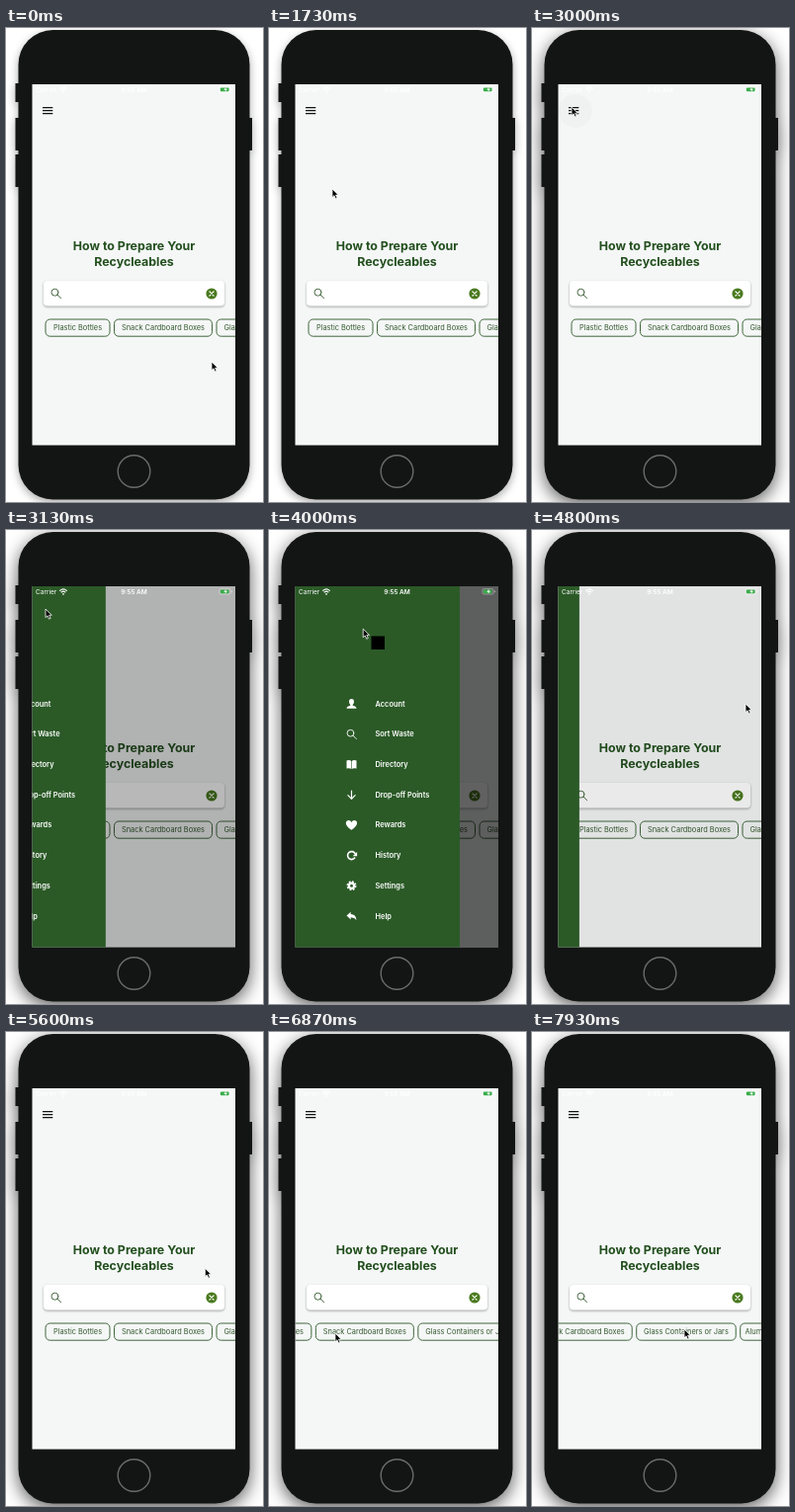
Recreate the animation shown at these times as an HTML page. Size 260x480 px, loop 8000 ms.

```html
<!DOCTYPE html>
<html lang="en">
<head>
<meta charset="utf-8">
<title>Recycling app</title>
<style>
html, body { margin: 0; width: 100%; height: 100%; overflow: hidden; background: #fff; }
svg { display: block; width: 260px; height: 480px; font: 7.4px Inter, sans-serif; }
#body { filter: drop-shadow(0 3px 4px rgba(0,0,0,.35)); }
#body.focused { filter: drop-shadow(0 5px 9px rgba(0,0,0,.65)); }
#bar { filter: drop-shadow(0 1px 1.2px rgba(0,0,0,.35)); }
.title { font-size: 12.4px; font-weight: 700; fill: #234f1e; text-anchor: middle; }
.chip rect { fill: none; stroke: #3f663a; }
.chip text { fill: #35592f; }
.line { fill: none; stroke-linecap: round; stroke-linejoin: round; }
.status { font-size: 6.5px; fill: #fff; }
#menu { fill: #fff; font-weight: 600; }
</style>
</head>
<body>
<svg viewBox="0 0 260 480">
  <defs>
    <clipPath id="screen"><rect x="26.5" y="57" width="205.5" height="365.5"/></clipPath>
  </defs>
  <g id="body" fill="#131414">
    <path d="M9.5 56h4v19h-4zM9.5 91h4v33h-4zM9.5 128h4v33h-4zM245 91h4v33h-4z"/>
    <rect x="12.5" y="2" width="234" height="475.5" rx="35"/>
  </g>
  <circle cx="129.5" cy="449" r="16.3" fill="none" stroke="#6a6b6b" stroke-width="1.4"/>

  <g clip-path="url(#screen)">
    <rect x="26" y="56" width="207" height="368" fill="#f5f7f7"/>
    <circle id="press" cx="44" cy="84" r="17" fill="#000" opacity=".02"/>
    <path d="M37 80.6h10.3M37 83.6h10.3M37 86.6h10.3" stroke="#111" stroke-width="1.3"/>
    <text class="title" x="129.5" y="225">How to Prepare Your</text>
    <text class="title" x="129.5" y="241">Recycleables</text>
    <rect id="bar" x="38" y="256" width="183" height="25.5" rx="4" fill="#fff"/>
    <path class="line" d="M53 267.7a3.5 3.5 0 1 1-7 0a3.5 3.5 0 1 1 7 0M52.1 270.2l3.5 3.5" stroke="#35592f" stroke-width=".9"/>
    <circle cx="208" cy="269" r="5.6" fill="#4a7a1f"/>
    <path class="line" d="M205.9 266.9l4.2 4.2m0-4.2l-4.2 4.2" stroke="#fff" stroke-width="1.2"/>
    <g id="chips"></g>
    <rect id="dim" x="26" y="56" width="207" height="368"/>
    <g id="drawer">
      <rect x="26" y="56" width="167" height="368" fill="#2b5a27"/>
      <rect x="103.5" y="107.5" width="13.5" height="13.5"/>
      <g id="menu"></g>
    </g>
    <g class="status">
      <text x="30" y="65">Carrier</text>
      <text x="129.5" y="65" text-anchor="middle" font-weight="600">9:55 AM</text>
      <path class="line" d="M54.6 61.4q3.4-3 6.8 0M56 63q2-1.7 4 0" stroke="#fff" stroke-width="1.1"/>
      <circle cx="58" cy="64.8" r=".9"/>
      <rect x="216" y="59.6" width="11" height="5.4" rx="1.4" fill="none" stroke="#fff" stroke-opacity=".6" stroke-width=".6"/>
      <path d="M228 61.2q1.4 1 0 2.2z"/>
      <rect x="216.9" y="60.4" width="8.6" height="3.8" rx=".8" fill="#39ad49"/>
      <path d="M222.6 59.8l-2.3 2.9h1.8l-.6 2.1 2.5-3h-1.8z"/>
    </g>
  </g>
  <path id="cursor" d="M0 0v8.6l2-1.8 1.5 3.3 1.6-.7-1.5-3.2h2.7z" fill="#000" stroke="#fff" stroke-width=".8"/>
</svg>

<script>
const $ = id => document.getElementById(id);
const LOOP = 8000;

const chips = [[40, 65, 'Plastic Bottles'], [109.5, 99, 'Snack Cardboard Boxes'],
  [213, 100.5, 'Glass Containers or Jars'], [318, 64, 'Aluminum Cans']];
$('chips').innerHTML = chips.map(([x, w, label]) => `<g class="chip">
  <rect x="${x}" y="295" width="${w}" height="17.2" rx="4.5"/>
  <text x="${x + w / 2}" y="306.3" text-anchor="middle">${label}</text></g>`).join('');

const stroke = (d, width) => `<path class="line" stroke="#fff" stroke-width="${width}" d="${d}"/>`;
const fill = d => `<path d="${d}"/>`;
const items = [
  ['Account', fill('M-2.5-2.3a2.5 2.8 0 0 1 5 0q0 2-1.3 3.2v.8q3.8.8 3.8 3h-10q0-2.2 3.8-3v-.8q-1.3-1.2-1.3-3.2z')],
  ['Sort Waste', stroke('M2.4-1a3.4 3.4 0 1 1-6.8 0a3.4 3.4 0 1 1 6.8 0M1.5 1.5l3.3 3.3', .9)],
  ['Directory', fill('M-5-4q3-1 4.7.5v8q-1.7-1.3-4.7-.4zM5-4q-3-1-4.7.5v8q1.7-1.3 4.7-.4z')],
  ['Drop-off Points', stroke('M0-4v8M-3.6.6L0 4.2 3.6.6', 1.2)],
  ['Rewards', fill('M0 5C-9-1-5-5-2.8-4.7Q-.8-4.6 0-2.8.8-4.6 2.8-4.7C5-5 9-1 0 5z')],
  ['History', stroke('M3.2 2.6A4 4 0 1 1 3.5-2', 1.6) + fill('M5.6-3.4v4.2H1.2z')],
  ['Settings', stroke('M2.6 0a2.6 2.6 0 1 1-5.2 0a2.6 2.6 0 1 1 5.2 0', 2.2) +
    `<circle r="4" fill="none" stroke="#fff" stroke-width="2" stroke-dasharray="1.7 1.44"/>`],
  ['Help', fill('M-5-.4L-.8-4.2v2.2Q4.5-1.8 5 4 3 1.3-.8 1.3v2.2z')]
];
$('menu').innerHTML = items.map(([label, icon], i) => `<g transform="translate(83.5 ${176 + i * 30.7})">
  ${icon}<text x="24" y="2.6">${label}</text></g>`).join('');

// time, x, y of the pointer
const pointer = [[0, 208, 338], [70, 208, 338], [870, 102, 222], [1730, 64, 163], [2600, 40, 80],
  [3270, 40, 80], [3470, 95, 100], [4000, 95, 100], [4550, 216, 176], [4850, 216, 176],
  [5670, 200, 245], [6530, 129, 298], [6600, 129, 300], [6870, 67, 305], [7000, 62, 305],
  [7930, 154, 301], [LOOP, 154, 301]];

const progress = (t, from, to) => Math.min(1, Math.max(0, (t - from) / (to - from)));
const smooth = u => u * u * (3 - 2 * u);

function pointerAt(t) {
  const i = pointer.findIndex(key => key[0] > t);
  const [t0, x0, y0] = pointer[i - 1], [t1, x1, y1] = pointer[i];
  const u = progress(t, t0, t1);
  return [x0 + (x1 - x0) * u, y0 + (y1 - y0) * u];
}

// Drag, then momentum
function scrollAt(t) {
  if (t < 6870) return -62 * progress(t, 6600, 6870);
  return -62 - 47 * (1 - Math.exp((6870 - t) / 320));
}

function draw() {
  const t = performance.now() % LOOP;
  const open = smooth(progress(t, 3010, 3270)) - smooth(progress(t, 4600, 4860));
  $('drawer').setAttribute('transform', `translate(${-167 * (1 - open)} 0)`);
  $('dim').setAttribute('opacity', .62 * open);
  $('press').style.display = t > 2900 && t < 3270 ? '' : 'none';
  $('body').classList.toggle('focused', t > 2850);
  $('chips').setAttribute('transform', `translate(${scrollAt(t)} 0)`);
  $('cursor').setAttribute('transform', `translate(${pointerAt(t)})`);
  requestAnimationFrame(draw);
}
draw();
</script>
</body>
</html>
```
